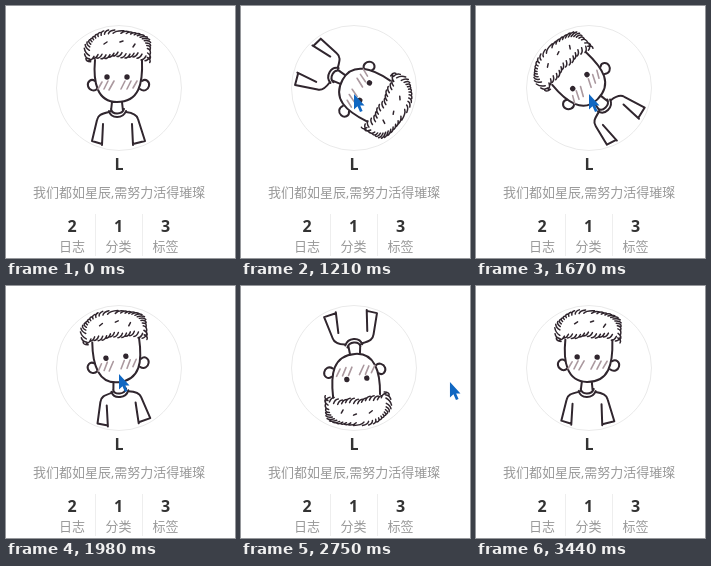
An HTML page that plays this animation: 229 by 252 pixels, repeating every 3990 ms.

```html
<!DOCTYPE html>
<html lang="zh">
<head>
<meta charset="utf-8">
<style>
  html, body { margin: 0; width: 100%; height: 100%; overflow: hidden; background: #fff; }
  svg { display: block; width: 229px; height: 252px; }
  text { font-family: "Open Sans", "Noto Sans CJK SC", "Noto Sans CJK", sans-serif; text-anchor: middle; font-size: 13px; fill: #999; }
  .strong { font-weight: 700; font-size: 16px; fill: #333; }
  #figure path { fill: none; stroke: #30262e; stroke-width: 2; stroke-linecap: round; stroke-linejoin: round; }
  #figure .blush { stroke: #ab999f; stroke-width: 1.6; }
  #figure .hair { stroke-width: 1.5; }
</style>
</head>
<body>
<svg viewBox="0 0 229 252">
  <clipPath id="disc"><circle cx="113" cy="82" r="62"/></clipPath>
  <g clip-path="url(#disc)">
    <g id="figure">
      <path d="M89 54C87 76 91 96 111 96C133 96 137 78 136 54"/>
      <path d="M89 75C85 72 81 76 82 80C83 84 88 86 91 83M136 75C140 72 144 76 143 80C142 84 138 86 134 83"/>
      <path d="M106 96L105 105M116 96L117 105M105 103C106 109 116 109 118 103M103 105C105 113 117 113 120 105"/>
      <path d="M103 106C95 108 92 109 91 114L86 135L96 138M97 118L96 139M120 106C128 107 131 109 132 113L139 135L127 138M126 118L127 139"/>
      <path class="blush" d="M96 76L92 83M102 75L98 83M108 75L103 84M119 75L115 83M125 75L121 83M131 75L127 82"/>
      <path class="hair" id="hair"/>
      <circle cx="101" cy="71" r="2.7" fill="#30262e"/>
      <circle cx="121" cy="71" r="2.7" fill="#30262e"/>
    </g>
  </g>
  <circle cx="113" cy="82" r="62.5" fill="none" stroke="#eaeaea"/>
  <text class="strong" x="113" y="164">L</text>
  <text x="113.2" y="190.5">我们都如星辰,需努力活得璀璨</text>
  <path d="M89.5 208V250M136.5 208V250" stroke="#eee"/>
  <text class="strong" x="66" y="226">2</text><text x="66" y="245">日志</text>
  <text class="strong" x="112.5" y="226">1</text><text x="112.5" y="245">分类</text>
  <text class="strong" x="159.5" y="226">3</text><text x="159.5" y="245">标签</text>
  <path id="cursor" d="M0 0V15.5L3.5 12.3L6 18L8.6 17L6.2 11.4H10.5Z" fill="#1067c2"/>
</svg>
<script>
const LOOP = 3990, FIRST = 900, STEP = 76.8;
const figure = document.getElementById('figure');
const cursor = document.getElementById('cursor');

// Cursor path: [ms, x, y]
const cursorPath = [
  [899, 220, 92], [980, 165, 91], [1060, 128, 89], [1140, 113, 88], [2130, 113, 88],
  [2280, 130, 88], [2430, 182, 92], [2590, 208, 96], [2750, 209, 96], [3140, 217, 238]
];

// Point on the boxy outline of the hair
function rim(degrees, scale) {
  const a = degrees * Math.PI / 180;
  const bend = v => Math.sign(v) * Math.abs(v) ** 0.75;
  const x = 112.5 + 31 * scale * bend(Math.cos(a));
  const y = 47 + 21 * scale * bend(Math.sin(a));
  return x.toFixed(1) + ' ' + y.toFixed(1);
}

// Overlapping short strokes around the top, slanted ones along the fringe
function hair() {
  let d = '';
  for (let a = 160, i = 0; a < 375; a += 8, i++)
    d += `M${rim(a, 0.94)}Q${rim(a + 4, 1.08)} ${rim(a + 11, 1.06 + 0.05 * Math.sin(i * 7))}`;
  for (let x = 83, i = 0; x < 140; x += 4, i++) {
    const y = 49 + 0.004 * (x - 112) ** 2 + Math.sin(i * 5);
    d += `M${x} ${y + 2}Q${x + 3} ${y + 2} ${x + 5} ${y - 2}`;
  }
  return d + 'M98 38L101 36M114 36L117 35M127 41L129 38';
}
document.getElementById('hair').setAttribute('d', hair());

// CSS "ease" curve
function ease(x) {
  if (x <= 0) return 0;
  if (x >= 1) return 1;
  let lo = 0, hi = 1, s;
  for (let i = 0; i < 24; i++) {
    s = (lo + hi) / 2;
    if (0.75 * s * (1 - s) + s ** 3 < x) lo = s; else hi = s;
  }
  return 0.3 * s * (1 - s) ** 2 + 3 * s * s * (1 - s) + s ** 3;
}

function placeCursor(t) {
  const i = cursorPath.findIndex(p => p[0] > t);
  cursor.style.display = i > 0 ? '' : 'none';
  if (i < 1) return;
  const [t0, x0, y0] = cursorPath[i - 1], [t1, x1, y1] = cursorPath[i];
  const k = (t - t0) / (t1 - t0);
  cursor.setAttribute('transform', `translate(${x0 + (x1 - x0) * k} ${y0 + (y1 - y0) * k})`);
}

function draw() {
  const time = (performance.now() - start) % LOOP;
  // The picture advances in even steps
  const t = time < FIRST ? 0 : FIRST + Math.floor((time - FIRST) / STEP) * STEP;
  const turn = ease((t - 940) / 1240) - ease((t - 2420) / 1080);
  figure.setAttribute('transform', `rotate(${360 * turn} 113 82)`);
  placeCursor(t);
  requestAnimationFrame(draw);
}
const start = performance.now();
draw();
</script>
</body>
</html>
```
